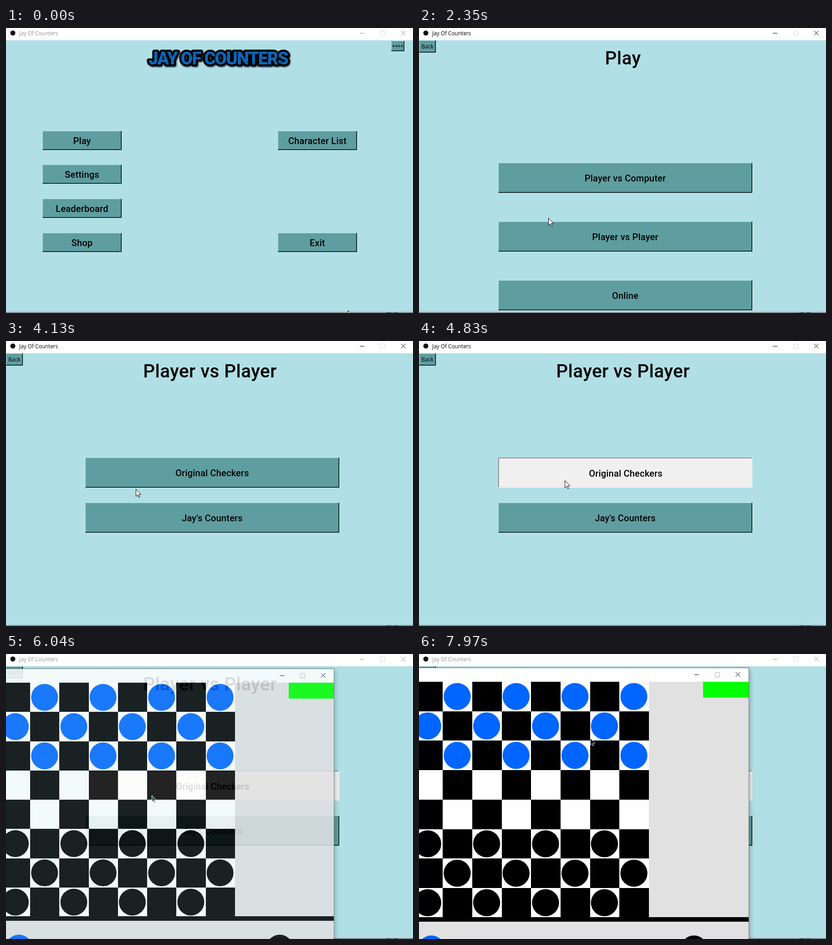
An HTML page that plays this animation: 894x626 px, repeating every 8 s.

```html
<!DOCTYPE html>
<html lang="en">
<head>
<meta charset="utf-8">
<title>Jay Of Counters</title>
<style>
  html, body { margin: 0; width: 100%; height: 100%; overflow: hidden; background: #b0e0e6; }
  svg { display: block; width: 894px; height: 626px; }
  text { font-family: Roboto, Inter, sans-serif; font-weight: 500; letter-spacing: .01em; text-anchor: middle; }
  .ui { font-family: "Open Sans", "Noto Sans", sans-serif; font-weight: 400; letter-spacing: 0; }
  .logo { font-weight: 900; letter-spacing: -1.6px; }
  rect { shape-rendering: crispEdges; }
</style>
</head>
<body>
<svg viewBox="0 0 894 626">
  <defs>
    <pattern id="worn" width="61" height="40" patternUnits="userSpaceOnUse"></pattern>
    <filter id="soft" x="-10%" y="-30%" width="120%" height="170%">
      <feDropShadow dx="1.5" dy="2" stdDeviation="1.2" flood-opacity=".6"/>
    </filter>
    <filter id="shade" filterUnits="userSpaceOnUse" x="-60" y="0" width="860" height="700">
      <feDropShadow dx="0" dy="4" stdDeviation="6" flood-opacity=".4"/>
    </filter>
  </defs>
  <g id="main"></g>
  <g id="game"></g>
  <circle id="click" r="11.5" fill="#faf540" opacity=".75"/>
  <path id="cursor" d="M.5 .5V16.5L4.2 13L6.6 18.6L8.9 17.6L6.5 12.1H11.6Z"/>
</svg>
<script>
const $ = id => document.getElementById(id);
const LOOP = 8000;

const rect = (x, y, w, h, fill) => `<rect x="${x}" y="${y}" width="${w}" height="${h}" fill="${fill}"/>`;
const disc = (x, y, r, fill) => `<circle cx="${x}" cy="${y}" r="${r}" fill="${fill}"/>`;
const label = (x, y, size, str, more = '') => `<text x="${x}" y="${y}" font-size="${size}" ${more}>${str}</text>`;

// Bevelled button; a pressed one turns pale and its text shifts by a pixel
function button(x, y, w, h, str, down) {
  const [face, tl, br, inner] = down
    ? ['#f0f0f0', '#808080', '#fff', '#e3e3e3']
    : ['#5f9ea0', '#a4dadf', '#000', '#2f5558'];
  const d = down ? 1 : 0;
  return rect(x, y, w, h, br) + rect(x, y, w - 1, h - 1, tl) +
    rect(x + 1, y + 1, w - 2, h - 2, inner) + rect(x + 1, y + 1, w - 3, h - 3, face) +
    (down ? rect(x + 1, y + 1, w - 3, 1, '#a8a8a8') + rect(x + 1, y + 1, 1, h - 3, '#a8a8a8') : '') +
    label(x + w / 2 + d, y + h / 2 + 7.5 + d, 20, str);
}

function smallButton(x, y, w, h, str, size, base) {
  return button(x, y, w, h, '') + label(x + w / 2, base, size, str, 'class="ui"');
}

// Minimise, maximise and close signs around the middle one
function controls(x, y, gap, ink, faint) {
  return `<g fill="none" stroke="${ink}"><path d="M${x - gap - 5} ${y + .5}h10"/>` +
    `<rect x="${x - 5}" y="${y - 5}" width="10" height="10" stroke="${faint}"/>` +
    `<path d="M${x + gap - 5} ${y - 5}l10 10m0 -10l-10 10"/></g>`;
}

function frame(active) {
  const ink = active ? '#000' : '#929292';
  return rect(0, 0, 894, 626, '#b0e0e6') + rect(0, 0, 894, 27, '#fff') +
    disc(15, 11, 5.5, '#111') +
    label(29, 16, 11.8, 'Jay Of Counters', `class="ui" style="text-anchor:start" fill="${ink}"`) +
    controls(827.5, 11, 45.2, ink, '#cfdde2') +
    rect(0, 624, 894, 1, '#667274') + rect(0, 625, 894, 1, '#a9a5a9') +
    rect(836, 625, 10, 1, '#444') + rect(851, 625, 9, 1, '#444');
}

const wide = (y, str, down) => button(174, y, 558, 66, str, down);
const back = () => smallButton(0, 27, 37, 27, 'Back', 12, 45);
const heading = str => label(448, 80, 40.4, str);
const logo = paint => label(466, 80, 38, 'JAY OF COUNTERS', `class="logo" ${paint}`);

const pages = {
  menu: down =>
    logo('stroke="#000" stroke-width="9" stroke-linejoin="round" filter="url(#soft)"') +
    logo('fill="url(#worn)"') +
    ['Play', 'Settings', 'Leaderboard', 'Shop']
      .map((s, i) => button(80, Math.round(225.8 + i * 74.6), 174, 42, s, down && !i)).join('') +
    button(597, 226, 174, 42, 'Character List') + button(597, 450, 174, 42, 'Exit') +
    smallButton(846, 28, 29, 23, '****', 11, 45),
  mode: down => back() + heading('Play') +
    wide(296, 'Player vs Computer') + wide(425, 'Player vs Player', down) + wide(554, 'Online'),
  versus: down => back() + heading('Player vs Player') +
    wide(256, 'Original Checkers', down) + wide(355, "Jay's Counters")
};

function gameWindow() {
  const cell = 64.7, left = -12.6, top = 61, blue = '#06f';
  let s = `<g filter="url(#shade)">${rect(-40, 30, 765, 640, '#6c7a7c')}</g>` +
    rect(-40, 31, 764, 30, '#fff') + rect(-40, 61, 764, 609, '#e1e1e1') +
    controls(655, 45, 45.5, '#000', '#b5b5b5');
  for (let r = 0; r < 8; r++) for (let c = 0; c < 8; c++) {
    const x = left + c * cell, y = top + r * cell, light = (r + c) % 2;
    s += rect(x, y, cell, cell, light ? '#fff' : '#000');
    if (light && (r < 3 || r > 4)) s += disc(x + cell / 2 - .6, y + cell / 2, 29.7, r < 3 ? blue : '#000');
  }
  return s + rect(-40, 578, 764, 10, '#000') + rect(624, 61, 100, 35, '#0f0') +
    disc(27, 648, 29.7, blue) + disc(604, 648, 29.7, '#000');
}

// Scratched blue for the big title
function wornBlue() {
  let seed = 7, d = '';
  const rnd = n => (seed = seed * 16807 % 2147483647) / 2147483647 * n;
  for (let i = 0; i < 60; i++) d += `M${rnd(61)} ${rnd(40)}l${rnd(6) - 3} ${rnd(7) - 2}`;
  return rect(0, 0, 61, 40, '#0b69bd') + `<path d="${d}" stroke="#06223e" stroke-width=".9"/>`;
}

// Pointer moves: first step, last step, number of steps, end point
const moves = [
  [70, 810, 11, 157, 275], [880, 1350, 7, 195, 254], [1590, 1670, 2, 197, 283],
  [1750, 2520, 11, 303, 447], [2580, 2580, 1, 304, 449], [3350, 3590, 4, 304, 442],
  [3820, 4130, 5, 285, 325], [4280, 4600, 5, 320, 306], [5300, 5460, 3, 320, 310],
  [6640, 6800, 3, 319, 312], [7040, 7500, 6, 330, 323], [7580, 7810, 5, 343, 308],
  [7890, 7970, 2, 376, 185]
];

function pointer(t) {
  let x = 751, y = 620;
  for (const [from, to, n, ex, ey] of moves) {
    if (t < from) break;
    const gap = (to - from) / (n - 1) || 1;
    const k = Math.min(1, (Math.floor((t - from) / gap + .01) + 1) / n);
    const e = k * k * (3 - 2 * k);
    x += (ex - x) * e;
    y += (ey - y) * e;
  }
  return [x, y];
}

// Opening of the game window: time, opacity, scale
const opening = [[0, 0, .94], [5860, .18, .959], [5950, .55, .98], [6040, .85, .993], [6120, 1, 1]];

const within = (t, a, b) => t >= a && t < b;
let shown = '';

function draw(t) {
  const page = t < 1590 ? 'menu' : t < 3120 ? 'mode' : 'versus';
  const down = within(t, 1430, 1590) || within(t, 2810, 3120) || t >= 4680;
  const active = within(t, 1350, 5780);
  const key = page + down + active;
  if (key !== shown) {
    $('main').innerHTML = frame(active) + pages[page](down);
    shown = key;
  }

  const [, alpha, scale] = opening.filter(o => t >= o[0]).pop();
  $('game').setAttribute('opacity', alpha);
  $('game').setAttribute('transform', `translate(213 352) scale(${scale}) translate(-213 -352)`);

  const [x, y] = pointer(t).map(Math.round);
  const dark = t >= 5780;
  const cursor = $('cursor');
  cursor.setAttribute('transform', `translate(${x} ${y}) scale(${dark ? .9 : 1})`);
  cursor.setAttribute('fill', dark ? (t < 6640 ? '#2f5c48' : '#000') : '#fff');
  cursor.setAttribute('stroke', dark ? '#f2faf6' : '#000');

  const click = $('click');
  const lit = down && t < 4830;
  click.setAttribute('visibility', lit ? 'visible' : 'hidden');
  click.setAttribute('cx', x);
  click.setAttribute('cy', y);
}

$('worn').innerHTML = wornBlue();
$('game').innerHTML = gameWindow();

const start = performance.now();
function tick() {
  draw((performance.now() - start) % LOOP);
  requestAnimationFrame(tick);
}
tick();
</script>
</body>
</html>
```
